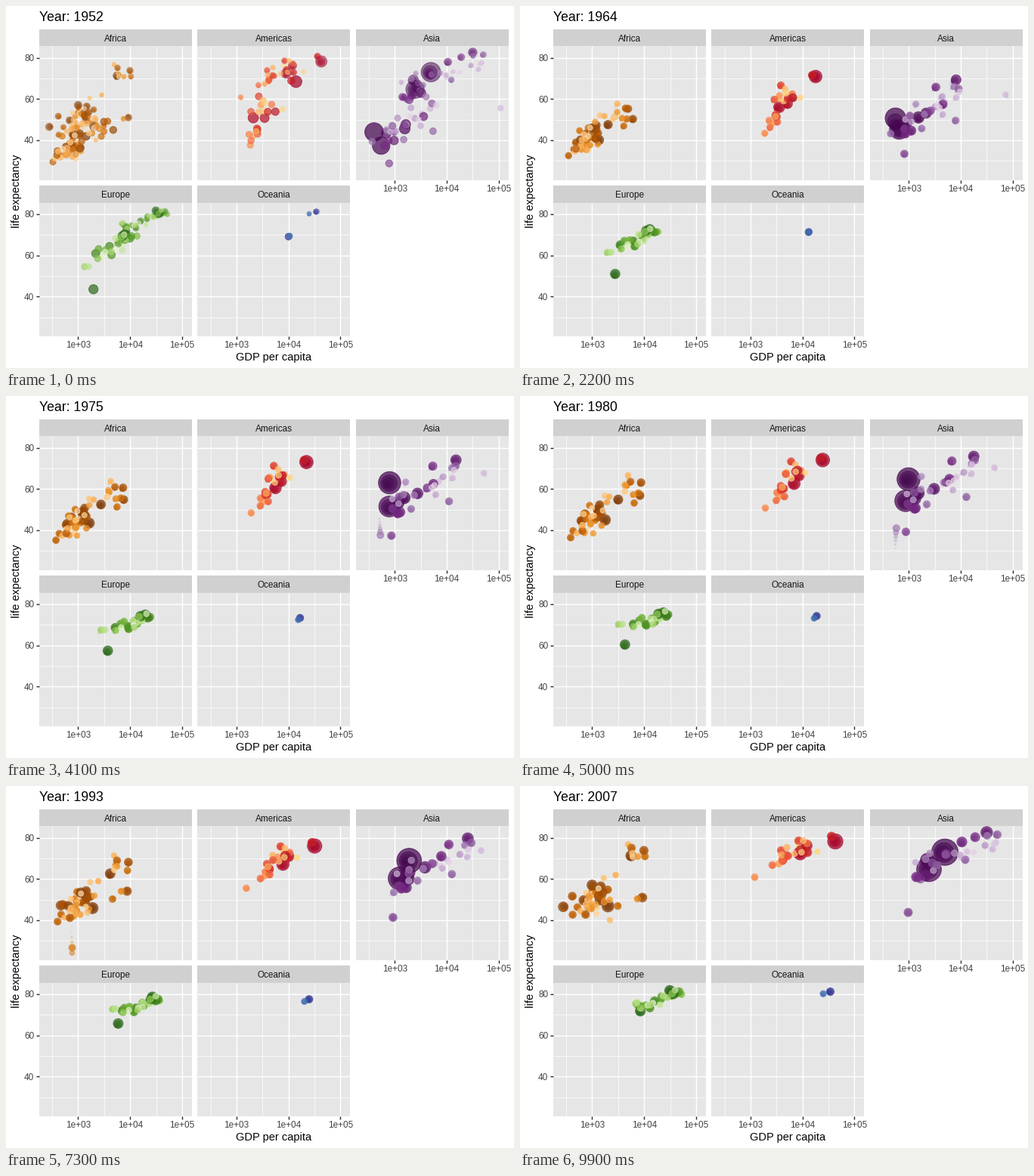
A matplotlib script for the animation above (10 s loop, 672x480 px).

```python
import numpy as np
import matplotlib.pyplot as plt
from matplotlib.animation import FuncAnimation
from matplotlib.colors import LinearSegmentedColormap
from matplotlib.patches import Rectangle

W, H, DPI = 672, 480, 100
FRAMES, WAKE = 100, 10
PX = 72 / DPI  # points per pixel
YEARS = np.linspace(1952, 2007, FRAMES)
rng = np.random.default_rng(21)


def cluster(n, pops, spread, *path, dip=None):
    """Tracks of n similar countries as (population, log GDP, life).

    path holds (GDP, life) at evenly spaced times; spread is the deviation
    around it. dip is a (year, depth) crisis lasting five years either way.
    """
    gdp, life = np.array(path).T
    keys = np.linspace(YEARS[0], YEARS[-1], len(path))
    tracks = []
    for pop in np.geomspace(*pops, n):
        u, v = rng.normal(size=2).clip(-1.7, 1.7)
        a, b = 0.35 * rng.normal(size=(2, len(path)))
        x = np.log10(gdp) + spread[0] * (u + a)
        y = life + spread[1] * (0.5 * u + 0.85 * v + b)
        y = np.interp(YEARS, keys, y)
        if dip:
            y -= dip[1] * np.maximum(0, 1 - abs(YEARS - dip[0]) / 5)
        tracks.append((pop, np.interp(YEARS, keys, x), y))
    rng.shuffle(tracks)
    return tracks


def country(pop, *path, dip=None):
    return cluster(1, (pop, pop), (0, 0), *path, dip=dip)


africa = (
    country(135, (1077, 36.3), (1780, 45), (2014, 46.9))
    + country(80, (1419, 41.9), (3150, 54.7), (5581, 71.3))
    + country(65, (781, 39.1), (735, 47.8), (278, 46.5))
    + country(44, (4725, 45), (8320, 56.9), (9270, 51))
    + country(9, (493, 42), (690, 48), (863, 46.2), dip=(1992, 23))
    + cluster(34, (76, 0.5), (0.2, 4.5), (800, 39), (1020, 48), (1080, 53))
    + cluster(8, (34, 0.6), (0.22, 4.5), (2300, 44), (5500, 59), (6500, 70))
    + cluster(5, (12, 0.6), (0.3, 4), (1500, 41), (3800, 53), (4500, 46)))

americas = (
    country(301, (13990, 68.4), (24500, 74), (42951, 78.2))
    + country(190, (2109, 50.9), (6900, 62.5), (9066, 72.4))
    + country(109, (3478, 50.8), (8600, 66.3), (11978, 76.2))
    + country(33, (11367, 68.8), (22500, 75), (36319, 80.7))
    + country(8.5, (1840, 37.6), (1940, 50.7), (1202, 60.9))
    + cluster(8, (29, 5.7), (0.11, 3), (2400, 43), (4000, 58), (4500, 70.5))
    + cluster(12, (44, 1), (0.14, 3), (3700, 57), (7200, 69), (9600, 75)))

asia = (
    country(1318, (400, 44), (655, 61.5), (1460, 67.8), (4959, 73),
            dip=(1962, 9))
    + country(1110, (547, 37.4), (715, 49.1), (1040, 59.1), (2452, 64.7))
    + country(169, (685, 43.4), (1310, 55.1), (2606, 65.5))
    + country(127, (3217, 63), (13000, 72.5), (24000, 78.9), (31656, 82.6))
    + country(32, (779, 28.8), (880, 39.2), (975, 43.8))
    + country(14, (368, 39.4), (570, 48), (1714, 59.7), dip=(1977, 16))
    + country(2.5, (108382, 55.6), (44500, 70.3), (47307, 77.6))
    + cluster(11, (224, 3), (0.2, 4.5), (900, 43), (1500, 56), (2400, 66))
    + cluster(8, (71, 1), (0.25, 4), (2600, 49), (5800, 61), (8000, 72))
    + cluster(7, (49, 0.7), (0.2, 3), (2600, 57), (10000, 70), (27000, 77.5)))

europe = (
    country(71, (1969, 43.6), (4250, 60.3), (8458, 71.8))
    + cluster(17, (82, 2), (0.14, 1.5), (7200, 68), (18500, 74), (30500, 79.7))
    + cluster(10, (39, 0.7), (0.15, 2), (3500, 62), (9800, 71), (12000, 74.5))
    + cluster(2, (4.5, 3.6), (0.09, 0.6), (1300, 54.5), (3650, 70),
              (6700, 75.6)))

oceania = (
    country(20.4, (10040, 69.1), (18700, 74.2), (34435, 81.2))
    + country(4.1, (10557, 69.4), (16800, 73.1), (25185, 80.2)))

# Panel: name, column, row, tracks, share of population in 1952, palette.
PANELS = [
    ("Africa", 0, 0, africa, 0.27, "#7F3B08 #B35806 #E08214 #FDB863 #FEE0B6"),
    ("Americas", 1, 0, americas, 0.43,
     "#A50026 #D73027 #F46D43 #FDAE61 #FEE090"),
    ("Asia", 2, 0, asia, 0.4, "#40004B #762A83 #9970AB #C2A5CF #E7D4E8"),
    ("Europe", 0, 1, europe, 0.75, "#276419 #4D9221 #7FBC41 #B8E186 #E6F5D0"),
    ("Oceania", 1, 1, oceania, 0.42, "#313695 #4575B4"),
]
PW, PH, STRIP = 202.07, 177.6, 22.4
X0, X1, Y0, Y1 = 2.248, 5.189, 20.65, 85.55


def px(log_gdp, left):
    return left + (log_gdp - X0) / (X1 - X0) * PW


def py(life, top):
    return top + (Y1 - life) / (Y1 - Y0) * PH


fig = plt.figure(figsize=(W / DPI, H / DPI), dpi=DPI, facecolor="white")
ax = fig.add_axes([0, 0, 1, 1])
ax.set(xlim=(0, W), ylim=(H, 0))
ax.axis("off")


def text(x, y, s, size, color="black", ha="center", **kw):
    return ax.text(x, y, s, fontsize=size * PX, color=color, ha=ha,
                   va="baseline", family="Liberation Sans", **kw)


def line(xs, ys, width, color="white"):
    ax.plot(xs, ys, color=color, lw=width * PX, zorder=1,
            solid_capstyle="butt")


def draw_panel(name, left, top):
    right, bottom = left + PW, top + PH
    for y, h, c in ((top - STRIP, STRIP, "#D0D0D0"), (top, PH, "#E6E6E6")):
        ax.add_patch(Rectangle((left, y), PW, h, fc=c, lw=0, zorder=0))
    text(left + PW / 2, top - 6.8, name, 11.73, "#151515")
    for shift, width in ((-0.5, 0.71), (0, 1.42)):
        for v in (3, 4, 5):
            line([px(v + shift, left)] * 2, (top, bottom), width)
        for v in (40, 60, 80):
            line((left, right), [py(v + 20 * shift, top)] * 2, width)
    if top > 200 or left > 400:
        for v in (3, 4, 5):
            x = px(v, left)
            line([x, x], (bottom, bottom + 3.7), 1.42, "#2B2B2B")
            text(x, bottom + 15, f"1e+0{v}", 11.73, "#434343")
    if left < 100:
        for v in (40, 60, 80):
            y = py(v, top)
            line((left - 3.7, left), [y, y], 1.42, "#2B2B2B")
            text(left - 6.6, y + 4.2, str(v), 11.73, "#434343", ha="right")


def build_paths():
    """Position and size of every country in every frame, and its colour."""
    t = np.linspace(0, 1, FRAMES)
    xs, ys, sizes, colors = [], [], [], []
    for name, col, row, tracks, share, palette in PANELS:
        left, top = 43.8 + 209.4 * col, 53.4 + 207.4 * row
        draw_panel(name, left, top)
        ramp = LinearSegmentedColormap.from_list(name, palette.split())
        rank = np.argsort(np.argsort([-track[0] for track in tracks]))
        for (pop, log_gdp, life), r in zip(tracks, rank):
            xs.append(px(log_gdp, left))
            ys.append(py(life, top))
            sizes.append(2 + 10 * np.sqrt(
                pop * (share + (1 - share) * t) / 1318))
            colors.append(ramp(r / (len(tracks) - 1)))
    return np.array(xs).T, np.array(ys).T, np.array(sizes).T, np.array(colors)


X, Y, SIZE, COLORS = build_paths()
text(354.3, 470, "GDP per capita", 14.67)
text(17.6, 245.8, "life expectancy", 14.67, rotation=90,
     rotation_mode="anchor")
title = text(43.8, 20.2, "", 17.6, ha="left")

# Each dot drags a wake of earlier copies that shrink and fade.
lag = np.arange(WAKE, -1, -1)
fade = (1 - lag / WAKE) ** 3
rgba = np.tile(COLORS, (WAKE + 1, 1))
rgba[:, 3] = 0.7 * np.repeat(fade, len(COLORS))
dots = ax.scatter([], [], lw=0.945 * PX, zorder=3)
dots.set_facecolor(rgba)
dots.set_edgecolor(rgba)


def update(i):
    past = (i - lag) % FRAMES
    radius = 1.4226 * SIZE[past] * fade[:, None] + 0.47
    dots.set_offsets(np.column_stack([X[past].ravel(), Y[past].ravel()]))
    dots.set_sizes((2 * PX * radius.ravel()) ** 2)
    title.set_text(f"Year: {round(YEARS[i])}")
    return dots, title


anim = FuncAnimation(fig, update, frames=FRAMES, interval=100,
                     repeat=True, repeat_delay=0, blit=False)
plt.show()
```
